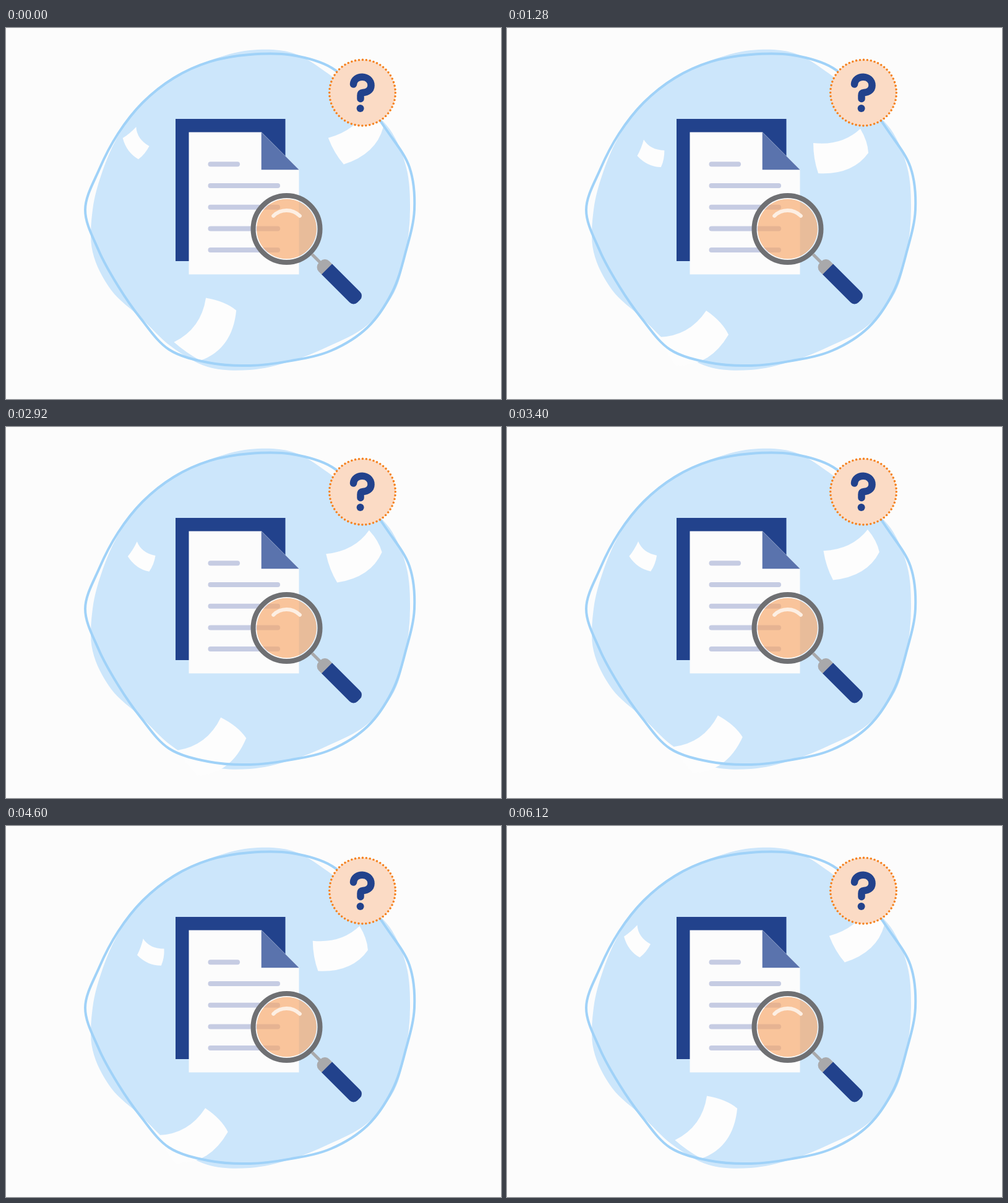
Animation, 800 px wide and 600 px high, one loop 6.24 s. Source, as an HTML page with a canvas:

```html
<!DOCTYPE html>
<html lang="en">
<head>
<meta charset="utf-8">
<title>Document search</title>
<style>
  html, body { margin: 0; width: 100%; height: 100%; overflow: hidden; background: #fcfcfc; }
  canvas { display: block; width: 800px; height: 600px; }
</style>
</head>
<body>
<canvas id="stage" width="800" height="600"></canvas>
<script>
const ctx = document.getElementById('stage').getContext('2d');
const LOOP = 6240, STEP = 40, LAST = 6120;
const NAVY = '#22428c', GREY = '#a9a9ab', BACK = '#fcfcfc', PAPER = '#fdfdfd';
const SKY = '#cce6fb', EDGE = '#a0d2f8';

// Closed smooth curve from radii at equal angles, clockwise from the right
function blob(radii) {
  const path = new Path2D(), n = radii.length;
  const at = i => {
    const a = 2 * Math.PI * i / n, r = radii[(i + n) % n];
    return [394 + r * Math.cos(a), 294 + r * Math.sin(a)];
  };
  path.moveTo(...at(0));
  for (let i = 0; i < n; i++) {
    const [a, b, c, d] = [at(i - 1), at(i), at(i + 1), at(i + 2)];
    path.bezierCurveTo(b[0] + (c[0] - a[0]) / 6, b[1] + (c[1] - a[1]) / 6,
                       c[0] - (d[0] - b[0]) / 6, c[1] - (d[1] - b[1]) / 6, c[0], c[1]);
  }
  path.closePath();
  return path;
}

const pond = blob([259, 261, 269, 266, 255, 254, 259, 263, 255, 248, 259, 263,
                   254, 246, 244, 245, 248, 250, 258, 263, 254, 250, 261, 262]);
const outline = blob([266, 261, 266, 269, 263, 253, 252, 256, 261, 249, 246, 253,
                      266, 252, 246, 245, 246, 248, 251, 259, 265, 257, 256, 267]);

// Each sheet eases from pose a to b to c, then back; a pose is x, y, degrees
const sheets = [
  {
    path: new Path2D('M-12-22Q-2-5 21-4Q21 11 15 23Q-7 22 -23 4Q-16-8 -12-22Z'),
    mid: 1520, end: 3120,
    a: [211, 185, 27], b: [235, 203.5, -3], c: [219.5, 209, 9.5]
  },
  {
    path: new Path2D('M-44-13Q2-8 32-36Q44-16 45 3Q19 39 -36 36Q-44 13 -44-13Z'),
    mid: 1300, end: 2880,
    a: [566.5, 174, -21], b: [539, 199, 0], c: [563, 208.8, -12]
  },
  {
    path: new Path2D('M-58 0Q-9-1 19-43Q45-25 55-4Q23 50 -32 45Q-48 23 -58 0Z'),
    mid: 1300, end: 2880,
    a: [324, 483.5, -25], b: [303, 500, 0], c: [334.4, 515, -8]
  }
];

const ease = u => u * u * (3 - 2 * u);

function poseAt({ mid, end, a, b, c }, time) {
  const t = Math.max(0, end - Math.abs(time - end));
  const [from, to, u] = t < mid ? [a, b, t / mid] : [b, c, (t - mid) / (end - mid)];
  return from.map((v, i) => v + (to[i] - v) * ease(u));
}

function drawSheet(sheet, time) {
  const [x, y, angle] = poseAt(sheet, time);
  ctx.save();
  ctx.translate(x, y);
  ctx.rotate(angle * Math.PI / 180);
  fill(sheet.path, PAPER);
  ctx.restore();
}

function fill(path, color) {
  ctx.fillStyle = color;
  ctx.fill(path);
}

function stroke(path, color, width, cap = 'round') {
  ctx.strokeStyle = color;
  ctx.lineWidth = width;
  ctx.lineCap = cap;
  ctx.stroke(path);
}

function circle(x, y, r, from = 0, to = 2 * Math.PI) {
  const path = new Path2D();
  path.arc(x, y, r, from, to);
  return path;
}

function box(x, y, w, h, radii = 0) {
  const path = new Path2D();
  path.roundRect(x, y, w, h, radii);
  return path;
}

const page = new Path2D('M295.5 168.5H413L473.5 229V398.5H295.5Z');
const fold = new Path2D('M412.7 168.5L473.5 229.3H412.7Z');
const hook = new Path2D('M561.5 91C562 75 590 75 590 93C590 101 583 104 577 104.5Q573 105 573 109V114.5');

function drawDocument() {
  fill(box(274, 147, 177.5, 230), NAVY);
  fill(page, BACK);
  fill(fold, '#5a73ad');
  for (let i = 0; i < 5; i++) {
    const y = 220.3 + i * 34.7;
    stroke(new Path2D(`M330.5 ${y}H${i ? 439 : 374}`), '#c6cce3', 8);
  }
}

function drawLens() {
  ctx.save();
  ctx.translate(453.5, 325);
  fill(circle(0, 0, 48.5), 'rgba(248,168,105,0.66)');
  stroke(circle(0, 0, 49.3), 'rgba(255,255,255,0.6)', 1.8);
  stroke(circle(0, 0, 54), '#6f7073', 8);
  stroke(circle(0, 0, 30, -2.36, -0.78), '#fdefe3', 6);
  ctx.rotate(Math.PI / 4);
  stroke(new Path2D('M58 0H80'), GREY, 5, 'butt');
  fill(box(75.5, -12, 18, 24, [10, 0, 0, 10]), GREY);
  fill(box(92, -12, 73, 24, [0, 9, 9, 0]), NAVY);
  ctx.restore();
}

function drawBadge() {
  const r = 53.3, dots = 56, ring = circle(576, 104.7, r);
  fill(ring, '#fbdbc5');
  ctx.setLineDash([0, 2 * Math.PI * r / dots]);
  stroke(ring, '#f5821f', 3.6);
  ctx.setLineDash([]);
  stroke(hook, NAVY, 11.5);
  fill(circle(572.6, 130, 6), NAVY);
}

function draw(now) {
  const time = Math.min(Math.floor(now % LOOP / STEP) * STEP, LAST);
  ctx.fillStyle = BACK;
  ctx.fillRect(0, 0, 800, 600);
  fill(pond, SKY);
  sheets.forEach(sheet => drawSheet(sheet, time));
  stroke(outline, EDGE, 4);
  drawDocument();
  drawLens();
  drawBadge();
}

const start = performance.now();
function tick() {
  draw(performance.now() - start);
  requestAnimationFrame(tick);
}
tick();
</script>
</body>
</html>
```
